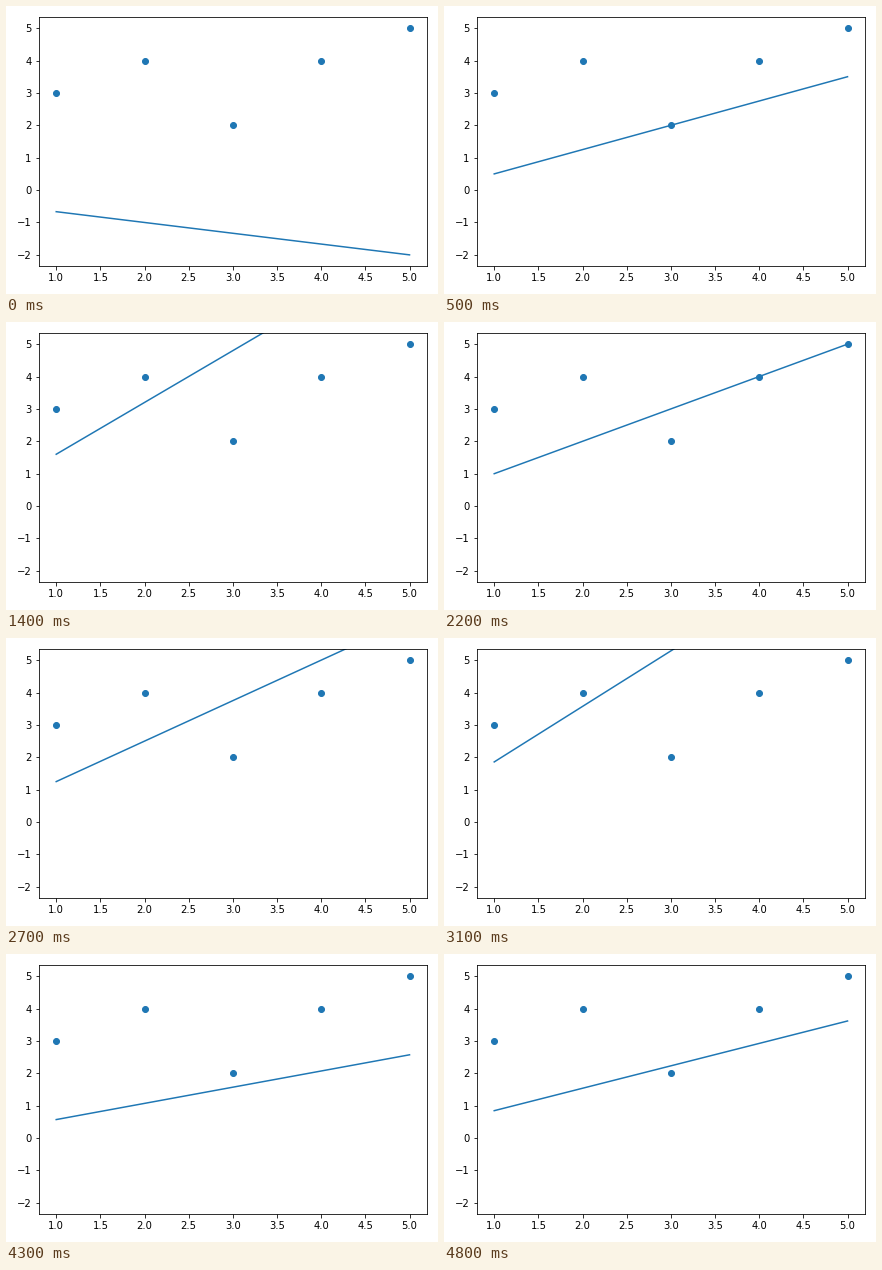
A matplotlib script for the animation above (5000 ms loop, 432x288 px).

```python
import matplotlib.pyplot as plt
import numpy as np
from matplotlib.animation import FuncAnimation

FRAMES = 50
INTERVAL = 100  # ms

# (x, y, label) in the order the perceptron visits them
SAMPLES = [(1, 3, -1), (4, 4, 1), (2, 4, -1), (5, 5, -1), (3, 2, 1)]


def train(steps):
    """Perceptron weights (x, y, bias) after each visited sample."""
    w = np.array([-1, -3, -1])
    history = []
    for i in range(steps):
        x, y, label = SAMPLES[i % len(SAMPLES)]
        point = np.array([x, y, 1])
        predicted = 1 if w @ point > 0 else -1
        if predicted != label:
            w = w + label * point
        history.append(w)
    return history


def boundary(w, x):
    """Height of the decision line; undefined when it is vertical."""
    if w[1] == 0:
        return np.full(len(x), np.nan)
    return -(w[0] * x + w[2]) / w[1]


weights = train(FRAMES)
xs = np.array([1.0, 5.0])

fig, ax = plt.subplots(figsize=(6, 4), dpi=72)
ax.scatter([s[0] for s in SAMPLES], [s[1] for s in SAMPLES], color="C0")
line, = ax.plot(xs, boundary(weights[0], xs), color="C0")
fig.tight_layout()


def update(i):
    line.set_ydata(boundary(weights[i], xs))
    return line,


anim = FuncAnimation(fig, update, frames=FRAMES, interval=INTERVAL,
                     repeat=True, repeat_delay=0)
plt.show()
```
